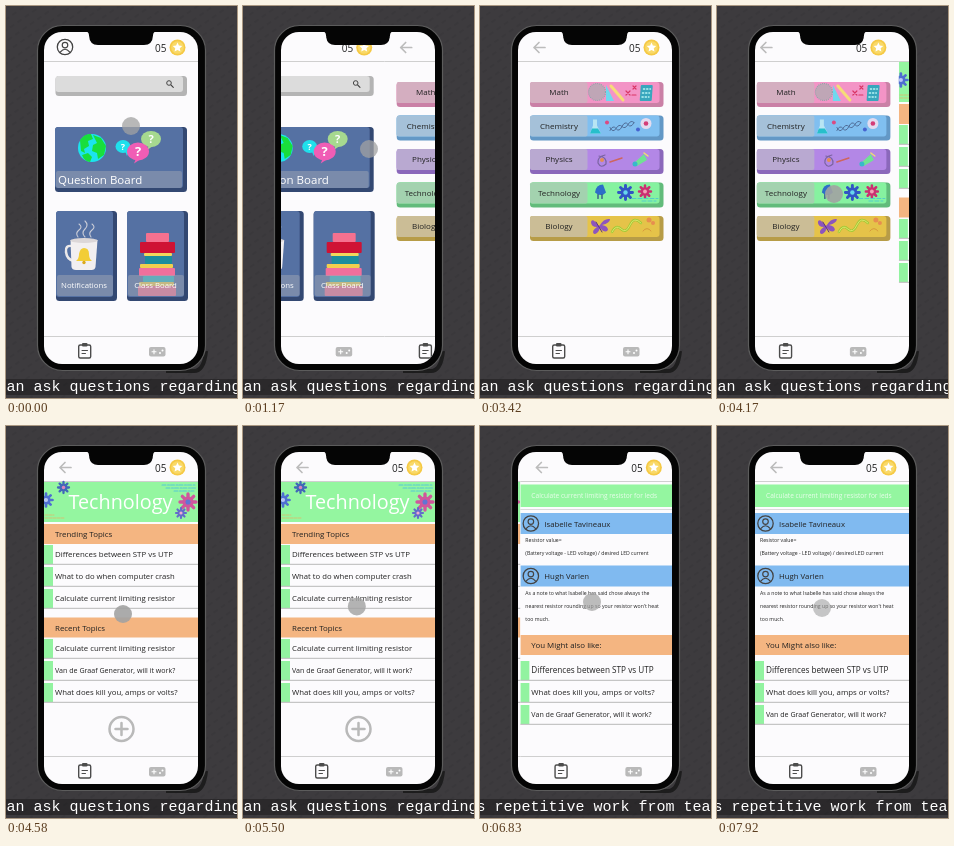
Recreate the animation shown at these times as an HTML page. Size 231 by 392 pixels, loop 8000 ms.

```html
<!DOCTYPE html>
<html lang="en">
<head>
<meta charset="utf-8">
<title>Question board app</title>
<style>
html, body { margin: 0; width: 100%; height: 100%; overflow: hidden; background: #3d3b3e; }
svg { display: block; width: 100%; height: 100%; }
text { font-family: "Open Sans", "Noto Sans", sans-serif; }
.caption { font-family: "Liberation Mono", monospace; font-size: 15px; fill: #fff; white-space: pre; }
</style>
</head>
<body>
<svg viewBox="0 0 231 392" preserveAspectRatio="none">
  <defs>
    <pattern id="stripes" width="9" height="9" patternUnits="userSpaceOnUse" patternTransform="rotate(-35)">
      <path d="M0 2H5" stroke="#373538" stroke-width="1.2"/>
    </pattern>
    <clipPath id="screen"><rect x="38" y="26" width="154" height="332" rx="18"/></clipPath>
    <clipPath id="page"><rect x="38" y="26" width="154" height="332"/></clipPath>
  </defs>
  <rect width="231" height="392" fill="#3d3b3e"/>
  <rect width="231" height="392" fill="url(#stripes)"/>
  <path d="M160 365H188Q198 365 200 345" fill="none" stroke="#111" stroke-width="4" opacity=".7"/>
  <rect x="31.500" y="19.500" width="168" height="345" rx="25" fill="#050505" stroke="#5c5c5c" stroke-width="1.2"/>
  <g clip-path="url(#screen)">
    <rect x="38" y="26" width="154" height="332" fill="#fcfbfd"/>
    <g id="pages"></g>
    <circle id="cursor" r="9" fill="#a2a2a2"/>
  </g>
  <path d="M79 25Q83 25.500 83 29.500Q83.500 39 92 39H138Q146.500 39 147 29.500Q147 25.500 151 25Z" fill="#050505"/>
  <rect y="373" width="231" height="16" fill="#000" opacity=".3"/>
  <text id="caption" class="caption" y="385"></text>
</svg>
<script>
const LOOP = 8000, WIDTH = 154, PUSH = 480;
const $ = id => document.getElementById(id);

const rect = (x, y, w, h, fill, rx = 0, extra = '') =>
  `<rect x="${x}" y="${y}" width="${w}" height="${h}" rx="${rx}" fill="${fill}" ${extra}/>`;
const text = (s, x, y, size, fill = '#222', extra = '') =>
  `<text x="${x}" y="${y}" font-size="${size}" fill="${fill}" ${extra}>${s}</text>`;
const dot = (x, y, r, fill, extra = '') =>
  `<circle cx="${x}" cy="${y}" r="${r}" fill="${fill}" ${extra}/>`;
const line = (d, stroke, w = 1, extra = '') =>
  `<path d="${d}" fill="none" stroke="${stroke}" stroke-width="${w}" stroke-linecap="round" stroke-linejoin="round" ${extra}/>`;
const shape = (d, fill) => `<path d="${d}" fill="${fill}"/>`;
const mid = 'text-anchor="middle"';

// Rounded card with a solid right and lower side
const slab = (x, y, w, h, face, side, depth = 4) =>
  rect(x, y, w + depth, h + depth, side, 3.5) + rect(x, y, w, h, face, 3);

const avatar = (x, y, r) =>
  dot(x, y, r, 'none', 'stroke="#444" stroke-width="1.3"') +
  dot(x, y - r * .25, r * .36, 'none', 'stroke="#444" stroke-width="1.2"') +
  line(`M${x - r * .62} ${y + r * .68}Q${x} ${y - r * .1} ${x + r * .62} ${y + r * .68}`, '#444', 1.2);

function star(x, y, r) {
  let d = '';
  for (let i = 0; i < 10; i++) {
    const a = i * Math.PI / 5, k = i % 2 ? r * .48 : r;
    d += `${i ? 'L' : 'M'}${x + k * Math.sin(a)} ${y - k * Math.cos(a)}`;
  }
  return shape(d + 'Z', '#fff');
}

function gear(x, y, r, color, core) {
  let teeth = '';
  for (let i = 0; i < 8; i++) {
    const a = i * Math.PI / 4;
    teeth += `M${x} ${y}l${r * Math.cos(a)} ${r * Math.sin(a)}`;
  }
  return line(teeth, color, r * .42) + dot(x, y, r * .7, color) + dot(x, y, r * .32, core);
}

function chrome(home) {
  const left = home ? avatar(59, 41, 7.7) : line('M65 41.500H54M59 36.500L54 41.500L59 46.500', '#bcbcbc', 1.7);
  return left + text('05', 149, 45.500, 10) +
    dot(171.500, 41.500, 8, '#f5c945') + dot(171.500, 41.500, 6.300, '#f9d968') + star(171.500, 41.500, 5) +
    line('M38 55.500H192', '#c4c4c4', .8) + line('M38 330.500H192', '#c4c4c4', .8) +
    rect(72.700, 339, 12, 13, 'none', 1.5, 'stroke="#4c4c4c" stroke-width="1.400"') +
    rect(76, 337, 5.500, 3.500, '#4c4c4c', 1) + line('M76 344.500H81.500M76 347.500H79.500', '#4c4c4c', 1) +
    rect(143, 341, 16.500, 9.500, '#b9b9b9', 2) +
    line('M146 345.700h4M148 343.700v4', '#fff', 1.1) + dot(154, 347, 1, '#fff') + dot(156.500, 344.500, 1, '#fff');
}

const bubble = (x, y, rx, ry, color, size, tail) =>
  `<ellipse cx="${x}" cy="${y}" rx="${rx}" ry="${ry}" fill="${color}"/>` +
  shape(`M${x + tail} ${y + ry - 2}l${tail} 5l${4 - tail} -4z`, color) +
  text('?', x, y + size * .36, size, '#fff', mid + ' font-weight="700"');

function homePage() {
  const blue = '#5571a3', side = '#334872', label = 'rgba(160,165,180,.5)';
  const books = [
    [140, 227, 23, 9, '#f5718f'], [134, 236, 35, 11, '#cf1234'], [138, 247, 28, 3, '#f2d75c'],
    [139, 250, 27, 8, '#1d8d9d'], [134, 258, 33, 4, '#f2cf4e'], [133, 262, 36, 8, '#f0709c'],
    [137, 270, 31, 6, '#29b5c3'], [133, 276, 35, 4, '#e9cb52'], [132, 280, 38, 10, '#ef7193']
  ];
  return slab(49.500, 70, 127.500, 16, '#dcdcdc', '#b4b4b4') +
    dot(163, 77, 2.300, 'none', 'stroke="#444" stroke-width="1"') + line('M165 79l2.300 2.300', '#444', 1.1) +
    slab(49, 121, 128, 61, blue, side) + slab(50, 205, 57, 86, blue, side) + slab(121, 205, 57, 86, blue, side) +
    dot(86, 142, 14, '#1ce3ee') +
    shape('M74 134q5 -7 11 -6l2 5l-5 2l1 5l-5 3l1 4l-4 -2zM87 129l8 3l5 8l-2 9l-6 4l-1 -6l-5 -2l1 -6l4 -2zM76 149l6 -2l4 4l-2 5q-6 -1 -8 -7z', '#19de3c') +
    bubble(117, 140.500, 7.500, 6.500, '#1fe0ec', 9, 2) + bubble(145, 133, 10, 8, '#a6d98f', 11, -2) +
    bubble(132, 145.500, 11, 9, '#f05db5', 13, -2) +
    rect(50, 165, 126, 17, label, 2) + text('Question Board', 52, 177.500, 11.5, '#fff') +
    line('M72 231q-3 -4 1 -7t0 -6M79 231q-4 -4 0 -8t0 -8M85 231q-3 -4 1 -7t0 -6', '#c8cbd6', 1.1) +
    line('M66 240q-7 -1 -6 6q1 8 8 9', '#ece9ea', 2.5) +
    shape('M64.500 234H91.500L89.500 261q-.5 3 -4 3H70q-4 0 -4.500 -3Z', '#f2eff0') +
    `<ellipse cx="78" cy="234.500" rx="13.500" ry="2.500" fill="#dcd7d8"/>` +
    shape('M70 255q3 -2 3 -7q1 -6 5 -6q5 0 5 6q0 5 3 7z', '#f2cd36') + dot(78, 256.500, 1.700, '#dba91e') +
    books.map(([x, y, w, h, c]) => rect(x, y, w, h, c, 1)).join('') +
    rect(51, 269, 56, 21, label, 2) + text('Notifications', 78, 282, 7.8, '#fff', mid) +
    rect(122, 269, 56, 21, label, 2) + text('Class Board', 149.500, 282, 7.8, '#fff', mid);
}

function subjectsPage() {
  const cards = [
    ['Math', '#f394c6', '#d4aec0', '#ca80a6'], ['Chemistry', '#80bff0', '#a5c1d9', '#6398c6'],
    ['Physics', '#b387e6', '#b9a9d1', '#8b68bb'], ['Technology', '#86f2a0', '#a3d2af', '#62bb7b'],
    ['Biology', '#e5c349', '#cbbd96', '#b79c47']
  ];
  const art = [
    dot(117, 10, 8.500, '#bfa6b6', 'stroke="#8fa5a8" stroke-width="1.200" stroke-dasharray="1 1"') +
      shape('M126 19V3l8 16z', '#70d8ee') + line('M131 4l12 14', '#f6dc78', 3) +
      line('M146 9l4 4m0 -4l-4 4M153 4l3 3m0 -3l-3 3M152 13h4', '#d93666', 1.2) +
      rect(161, 3, 12, 16, '#38a6bd', 1, 'transform="skewX(-4)"') +
      line('M163.500 7h7M162.500 11h7M162 15h7', '#b9f5f5', 1.4, 'stroke-dasharray="1.200 2"'),
    shape('M113 4h4v6l4 8h-11l3 -8z', '#b8e5f3') + shape('M112 13h6l3 5h-11z', '#27bfcb') + dot(127, 7, 2, '#db4b82') +
      line('M130 15q3 -6 6 -2t6 -2t6 -2t6 -2M130 12q3 6 6 1t6 -2t6 -2t6 -2', '#4f6d98', 1) +
      dot(166, 8, 5.500, '#e3dcf0') + dot(166, 8, 2.300, '#d43d78') + dot(158, 14, 2, '#4664cf'),
    line('M119 7q8 1 7 8q-5 5 -8 -1q-1 -6 7 -8', '#7b64a2', 1.2) + dot(122, 11, 2, '#e48e53') + line('M130 13l12 -4', '#ce655f', 1.5) +
      shape('M153 15l11 -10l3 6l-10 6z', '#70e294') + dot(155, 15, 2.500, '#37b9ca') + line('M164 4l4 3', '#f0e26d', 1.3),
    shape('M115 10q1 -8 8 -8l3 8q-5 5 -11 0z', '#2d6ec8') + line('M118 12v4M122 12v4', '#283c84', 1.2) +
      gear(145.500, 10, 7, '#3155c4', '#67d6ec') + gear(165, 9, 6, '#cc2f71', '#f2a2b7') +
      line('M152 16H178M162 18.500H176', '#4fc9cf', .9, 'stroke-dasharray="4 2"'),
    shape('M119 10q-7 -9 -8 -4q0 5 6 5q-6 4 -3 7q4 0 6 -6q5 6 8 2q0 -4 -6 -5q8 -2 8 -6q-6 -1 -10 6z', '#8d55bd') + line('M116 6l6 10', '#5d347f', 1) +
      line('M132 16q4 -8 9 -3t9 -4t11 -2', '#a4c936', 2.500) + line('M132 16q4 -8 9 -3t9 -4t11 -2', '#e9ed77', .8) +
      dot(169, 4, 2.500, '#e78e4f') + dot(173, 7, 2, '#e78e4f') + line('M163 15q4 -5 8 0', '#d7983c', 1)
  ];
  return cards.map(([name, face, tint, side], i) =>
    `<g transform="translate(0 ${76 + 33.5 * i})">` + slab(50, 0, 129.500, 21, face, side) +
    rect(50, 0, 57.500, 21, tint, 2) + text(name, 79, 13.300, 8, '#222', mid) + art[i] + '</g>').join('');
}

const band = (s, y, h) => rect(38, y, WIDTH, h, '#f4b581') + text(s, 49, y + h / 2 + 3, 7.9);
const row = (s, y, size = 7.8) =>
  rect(38, y - 9, 9, 19, '#92f3a0') + line(`M38 ${y + 10.3}H192`, '#b8b8b8', 1) + text(s, 49, y + 2.900, size);

function topicsPage() {
  return rect(38, 56, WIDTH, 40, '#94f6a0') +
    line('M156 59H190M160 62H190M168 65H188', '#58c9d6', 1.1, 'stroke-dasharray="4 1.500 2 1"') +
    line('M39 92H58M39 89H48', '#d5bf6e', .9, 'stroke-dasharray="3 1"') +
    gear(40, 74, 6.500, '#4f6fd1', '#b5c6f4') + gear(57.500, 61.500, 5.500, '#4268b8', '#dc85bd') +
    gear(182, 76, 8, '#cf579d', '#6075d4') + gear(175, 87, 5, '#636cca', '#f0acd1') +
    text('Technology', 114.500, 83, 19.8, '#fff', mid) +
    band('Trending Topics', 98, 20) +
    row('Differences between STP vs UTP', 128, 7.9) + row('What to do when computer crash', 150, 7.7) +
    row('Calculate current limiting resistor', 172) +
    band('Recent Topics', 191.500, 20) +
    row('Calculate current limiting resistor', 222) + row('Van de Graaf Generator, will it work?', 244, 7.1) +
    row('What does kill you, amps or volts?', 266) +
    dot(115.500, 303, 12, 'none', 'stroke="#b9b9b9" stroke-width="2.500"') + line('M109.500 303h12M115.500 297v12', '#b9b9b9', 2.500);
}

function answerPage() {
  const reply = (name, y) => rect(38, y, WIDTH, 21, '#80baf0') + avatar(48.500, y + 10.500, 7.700) + text(name, 62, y + 13.500, 7.8);
  const note = (s, y) => text(s, 43, y, 5.15);
  return rect(38, 58.500, WIDTH, 22.500, '#94f6a0') +
    text('Calculate current limiting resistor for leds', 49, 72, 6.55, '#fff', 'opacity=".8"') +
    line('M38 83.500H192', '#d2d2d2', .8) +
    reply('Isabelle Tavineaux', 87) + note('Resistor value=', 115.500) +
    note('(Battery voltage - LED voltage) / desired LED current', 129) +
    reply('Hugh Varlen', 139.500) + note('As a note to what Isabelle has said chose always the', 168.500) +
    note('nearest resistor rounding up so your resistor won\'t heat', 182) + note('too much.', 195) +
    band('You Might also like:', 209, 20) +
    row('Differences between STP vs UTP', 244, 8.2) + row('What does kill you, amps or volts?', 266, 7.85) +
    row('Van de Graaf Generator, will it work?', 288, 7.1);
}

$('pages').innerHTML = [homePage, subjectsPage, topicsPage, answerPage]
  .map((page, i) => `<g transform="translate(${i * WIDTH} 0)" clip-path="url(#page)">${chrome(i === 0)}${page()}</g>`).join('');

const clamp = v => Math.max(0, Math.min(1, v));
const ease = v => v < .5 ? 2 * v * v : 1 - 2 * (1 - v) ** 2;
const pushes = [977, 4084, 6393];

// time, x, y, opacity
const path = [
  [0, 125, 120, .75], [250, 125, 120, .75], [850, 126, 143, .75], [1500, 126, 143, .75], [1750, 126, 143, 0],
  [3480, 117, 196, 0], [3700, 117, 188, .9], [5100, 117, 188, .9], [5800, 112, 176, .75],
  [7250, 112, 176, .7], [7900, 105, 182, .6], [LOOP, 105, 182, .6]
];

function pointer(t) {
  const i = path.findIndex(k => k[0] > t), a = path[i - 1], b = path[i];
  const k = ease((t - a[0]) / (b[0] - a[0]));
  return a.map((v, j) => v + (b[j] - v) * k);
}

function draw(t) {
  const page = pushes.reduce((sum, start) => sum + ease(clamp((t - start) / PUSH)), 0);
  $('pages').setAttribute('transform', `translate(${-page * WIDTH} 0)`);
  const [, x, y, alpha] = pointer(t), cursor = $('cursor');
  cursor.setAttribute('cx', x);
  cursor.setAttribute('cy', y);
  cursor.setAttribute('opacity', alpha);
  const late = t >= 6080, caption = $('caption');
  caption.setAttribute('x', late ? -3.5 : .5);
  caption.textContent = late ? 's repetitive work from tea' : 'an ask questions regarding';
}

function tick() {
  draw(performance.now() % LOOP);
  requestAnimationFrame(tick);
}
tick();
</script>
</body>
</html>
```
